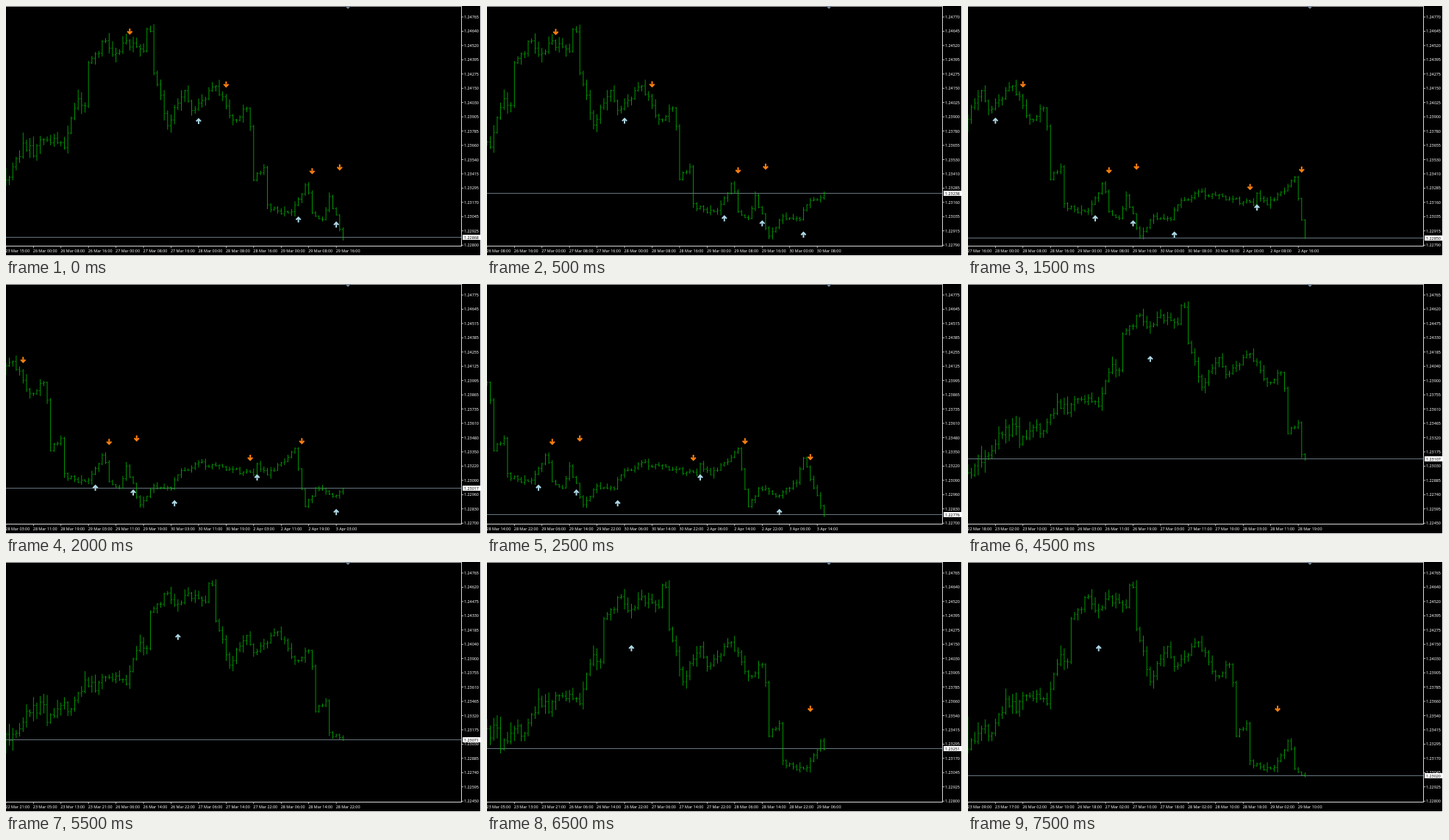
Animation of 646x341 px, one loop 8000 ms. Source, as an HTML page with a canvas:

```html
<!DOCTYPE html>
<html lang="en">
<head>
<meta charset="utf-8">
<title>Hourly price chart replay</title>
<style>
  html, body { margin: 0; width: 100%; height: 100%; overflow: hidden; background: #fff; }
  canvas { display: block; width: 646px; height: 341px; }
</style>
</head>
<body>
<canvas id="chart"></canvas>
<script>
const W = 646, H = 341, STEP = 500;
const PITCH = 4.68, LAST_X = 458.5, SPAN = 98;
const AXIS_X = 620, AXIS_Y = 328, TOP_Y = 15, ROW = 19.45, ROWS = 17;
const GREEN = '#00bc00', ORANGE = '#ff8010', BLUE = '#add8e6';
const SLATE = '#66747f', WHITE = '#fff', FRAME = '#d8d8d8';

const canvas = document.getElementById('chart');
const ratio = window.devicePixelRatio || 1;
canvas.width = W * ratio;
canvas.height = H * ratio;
const ctx = canvas.getContext('2d');
ctx.scale(ratio, ratio);

// Prices are in points above 1.22000.
// Key points of the close: [bar, price]
const turns = [
  [0, 1150], [4, 960], [14, 1350], [18, 1430], [19, 1250], [24, 1450], [25, 1360],
  [30, 1680], [33, 1570], [36, 1710], [42, 1640], [46, 2060], [48, 2000], [49, 2370],
  [54, 2560], [56, 2440], [59, 2540], [65, 2470], [66, 2660], [67, 2640], [68, 2280],
  [72, 1830], [77, 2130], [79, 1960], [86, 2170], [91, 1880], [95, 1980], [96, 1820],
  [97, 1360], [98, 1417], [100, 1470], [101, 1150], [105, 1071], [108, 1090], [112, 1320],
  [113, 1251], [114, 1080], [117, 1020], [119, 1220], [123, 868], [127, 1040], [132, 1010],
  [134, 1140], [140, 1250], [156, 1140], [157, 1240], [160, 1140], [166, 1300], [168, 1380],
  [171, 850], [174, 1020], [180, 950], [185, 1070], [187, 1290], [193, 776]
];

// Newest bar at each step; the replay starts over at RERUN
const newest = [123, 139, 155, 171, 182, 193, 96, 98, 100, 102, 103, 105, 109, 113, 115, 117];
const RERUN = 6;

// Price scale in force before step `until`: top label and distance between labels
const scales = [
  { until: 1, top: 2763.75, gap: 122.6 },
  { until: 4, top: 2768, gap: 123.65 },
  { until: 6, top: 2774, gap: 129.6 },
  { until: 12, top: 2765.4, gap: 144.6 },
  { until: 16, top: 2763.75, gap: 122.6 }
];

// Signals: [bar, price]
const runs = [
  {
    sell: [[61, 2639], [89, 2184], [114, 1439], [122, 1471], [155, 1294], [170, 1446], [189, 1301]],
    buy: [[81, 1868], [110, 1022], [121, 978], [133, 880], [157, 1115], [180, 800]]
  },
  { sell: [[109, 1597]], buy: [[57, 2116]] }
];

let seed = 29;
function rand() {
  seed = (seed * 16807) % 2147483647;
  return seed / 2147483647;
}

// Closes wander between the key points; wicks shrink as the market calms.
function buildBars() {
  const bars = [];
  const calm = k => Math.max(0.6, 1.8 - k / 100);
  let prev = 1200;
  const add = close => {
    const k = bars.length, wick = () => (8 + 55 * rand() ** 1.5) * calm(k);
    bars.push({
      open: prev, close,
      high: Math.max(prev, close) + wick(),
      low: Math.min(prev, close) - wick()
    });
    prev = close;
  };
  add(turns[0][1]);
  for (let i = 1; i < turns.length; i++) {
    const [a, p] = turns[i - 1], [b, q] = turns[i];
    for (let k = a + 1; k <= b; k++) {
      const wobble = k < b ? (rand() - 0.5) * 70 * calm(k) : 0;
      add(p + (q - p) * (k - a) / (b - a) + wobble);
    }
  }
  return bars;
}
const bars = buildBars();

function rect(x, y, w, h, color) {
  ctx.fillStyle = color;
  ctx.fillRect(x, y, w, h);
}

function label(text, x, y, color) {
  ctx.fillStyle = color;
  ctx.fillText(text, x, y);
}

const quote = p => '1.' + (22000 + Math.round(p));

function stamp(k) {
  const hours = k < 33 ? k - 34 : k - 33;   // the week opens one hour late
  let day = Math.floor(hours / 24);
  const hour = hours - day * 24;
  if (day < 0) day -= 2;                    // weekends
  if (day > 4) day += 2;
  const date = 26 + day;
  const name = date > 31 ? (date - 31) + ' Apr' : date + ' Mar';
  return name + ' ' + String(hour).padStart(2, '0') + ':00';
}

function drawBar(bar, x, toY) {
  const top = toY(bar.high);
  rect(x - 0.4, top, 0.8, toY(bar.low) - top, GREEN);
  rect(x - 1.8, toY(bar.open) - 0.3, 1.4, 0.6, GREEN);
  rect(x + 0.4, toY(bar.close) - 0.3, 1.4, 0.6, GREEN);
}

function drawArrow(x, y, dir, color) {
  ctx.save();
  ctx.translate(x, y);
  ctx.scale(1, dir);
  ctx.strokeStyle = color;
  ctx.lineWidth = 2;
  ctx.beginPath();
  ctx.moveTo(0, -4);
  ctx.lineTo(0, 3);
  ctx.moveTo(-3.2, -0.3);
  ctx.lineTo(0, 3);
  ctx.lineTo(3.2, -0.3);
  ctx.stroke();
  ctx.restore();
}

function drawFrame() {
  rect(0, 0, AXIS_X, 1, '#b4b4b4');
  rect(AXIS_X - 1, 0, 1, AXIS_Y, FRAME);
  rect(0, AXIS_Y - 1, AXIS_X, 1, FRAME);
  ctx.fillStyle = '#788898';
  ctx.beginPath();
  ctx.moveTo(461, 0);
  ctx.lineTo(469, 0);
  ctx.lineTo(465, 4);
  ctx.fill();
}

function draw(step) {
  const last = newest[step], first = last - SPAN;
  const { top, gap } = scales.find(s => step < s.until);
  const toX = k => LAST_X - (last - k) * PITCH;
  const toY = p => TOP_Y + (top - p) * ROW / gap;

  rect(0, 0, W, H, WHITE);
  rect(0, 0, 645, 340, '#000');
  ctx.font = '5.4px "Noto Sans", "Open Sans", sans-serif';

  const price = bars[last].close, lineY = Math.floor(toY(price));
  rect(0, lineY, AXIS_X, 1, SLATE);
  for (let k = Math.max(0, first); k <= last; k++) drawBar(bars[k], toX(k), toY);

  const { sell, buy } = runs[step < RERUN ? 0 : 1];
  const mark = (list, dir, color) => list
    .filter(([k]) => k >= first && k < last)
    .forEach(([k, p]) => drawArrow(toX(k), toY(p), dir, color));
  mark(sell, 1, ORANGE);
  mark(buy, -1, BLUE);

  drawFrame();
  for (let i = 0; i < ROWS; i++) {
    const y = TOP_Y + i * ROW;
    rect(AXIS_X, y - 0.4, 2.2, 0.8, FRAME);
    label(quote(Math.round((top - i * gap) / 5) * 5), 623, y + 2, WHITE);
  }
  rect(AXIS_X + 1, lineY - 3, 24, 7, WHITE);
  label(quote(price), 623, lineY + 2.5, '#000');

  for (let k = first; k < last; k += 8) {
    const x = toX(k);
    rect(x - 0.4, AXIS_Y, 0.8, 2.2, FRAME);
    label(stamp(k), x - 0.5, 335.9, WHITE);
  }
}

const start = performance.now();
let shown = -1;
function tick(now) {
  const step = Math.floor(Math.max(0, now - start) / STEP) % newest.length;
  if (step !== shown) draw(shown = step);
  requestAnimationFrame(tick);
}
draw(shown = 0);
requestAnimationFrame(tick);
</script>
</body>
</html>
```
